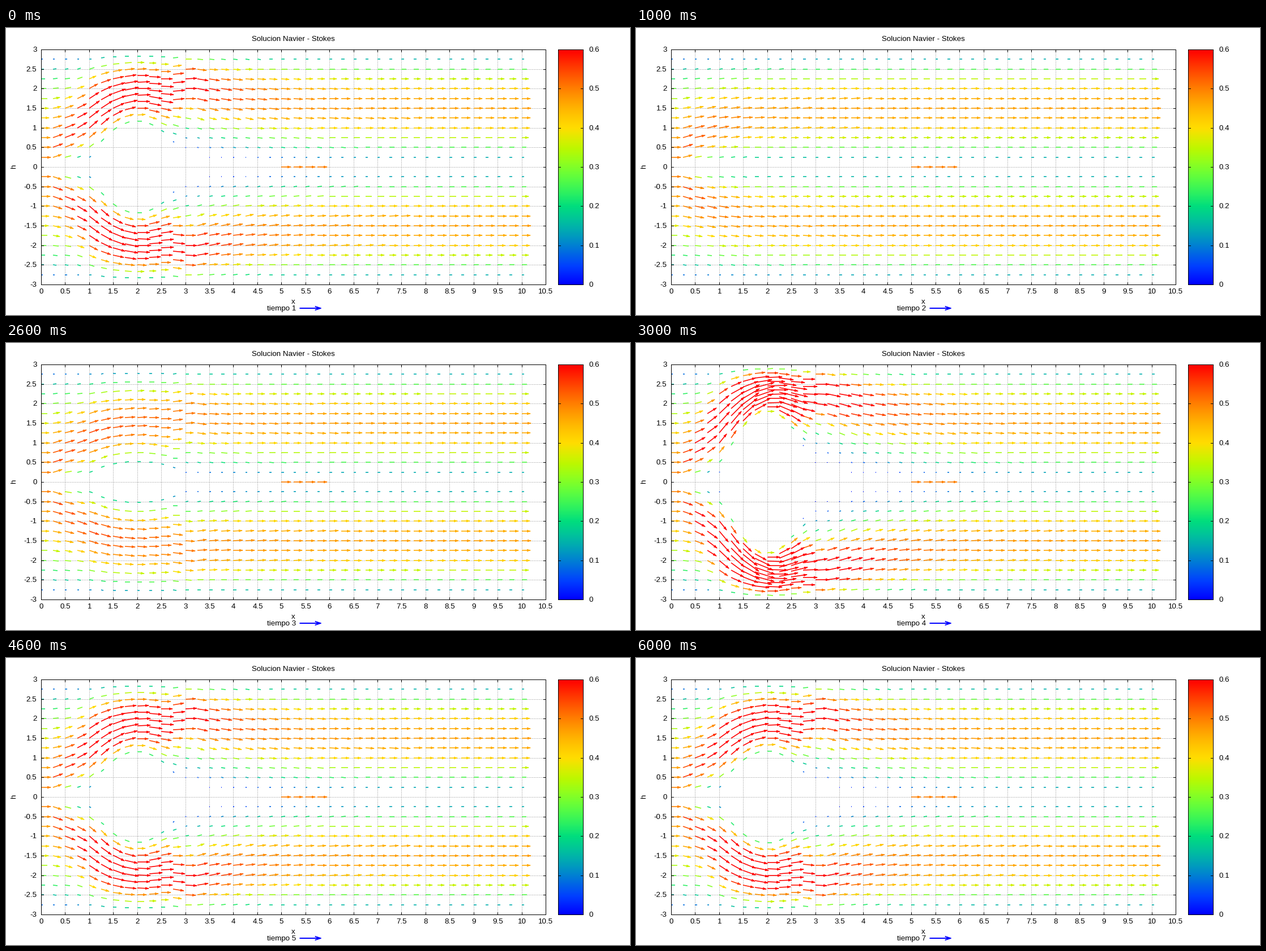
A matplotlib script that plays this animation: 1102 px wide and 508 px high, repeating every 7 s.

```python
import numpy as np
import matplotlib.pyplot as plt
from matplotlib.animation import FuncAnimation
from matplotlib.collections import LineCollection, PolyCollection
from matplotlib.patches import Rectangle

W, H, DPI = 1102, 508, 100
LEFT, RIGHT, TOP, BOTTOM = 62, 953, 38, 454
BAR_LEFT, BAR_RIGHT = 975, 1019
PX = 72 / DPI                      # one pixel in points
HALF = 3.0                         # half height of the channel
SCALE = 0.4                        # arrow length per unit of speed
HEAD_SPEED = 0.353                 # slower arrows carry no head
BUMPS = [1, 0, 0.3, 1.7, 0.98, 1, 1]
FINE = np.linspace(0, 1, 401)

plt.rcParams["font.family"] = "Liberation Sans"
plt.rcParams["font.size"] = 13.4 * PX


def px(x):
    return LEFT + x * (RIGHT - LEFT) / 10.5


def py(h):
    return (TOP + BOTTOM) / 2 - h * (BOTTOM - TOP) / (2 * HALF)


def palette(speed):
    t = np.clip(np.asarray(speed) / 0.6, 0, 1)
    rgb = [3 * t - 1, np.sin(np.pi * t), 1.16 - 2 * t]
    return np.clip(np.stack(rgb, axis=-1), 0, 1)


def bump_height(x, bump):
    return bump * max(0, 1 - (x - 2) ** 2)


def flux(x, h, bump):
    """Share of the flow that passes between the inner wall and height h."""
    front = max(min(x, 2 - x), 0)
    wake = np.clip(x - 2, 0, 1) ** 3 * np.exp(-max(x - 3, 0) / 1.2)
    blocking = 1 + bump * min(x, 1) ** 2
    delta = max((0.17 * x + 0.06 * x ** 3) * blocking, 1e-3)
    inlet = np.exp(-(x / 1.3) ** 2 * blocking)
    power = 1 + bump * (0.5 * front ** 2 + 1.6 * wake)
    shape = -np.expm1(-(FINE / delta) ** power) * (1 - FINE) * (1 + inlet * FINE)
    total = np.concatenate([[0], np.cumsum(shape[1:] + shape[:-1])])
    base = bump_height(x, bump)
    s = np.clip((h - base) / (HALF - base), 0, 1)
    return np.interp(s, FINE, total / total[-1])


def column(x, bump):
    base = bump_height(x, bump)
    h = base + np.arange(1, 12) / 12 * (HALF - base)
    u = (flux(x, h + 0.02, bump) - flux(x, h - 0.02, bump)) / 0.04
    u *= 1 - 0.06 * min(x / 2, 1)
    if x == 0:
        v = np.zeros_like(u)
    else:
        v = (flux(x - 0.1, h, bump) - flux(x + 0.1, h, bump)) / 0.2
    if x == 10:
        u *= 1.01
    return np.stack([np.full_like(h, x), h, u, v], axis=1)


def field(bump):
    upper = np.concatenate([column(k / 4, bump) for k in range(41)])
    lower = upper * [1, -1, 1, -1]
    middle = [[x, 0, 0.5, 0] for x in (5, 5.25, 5.5, 5.75)]
    return np.concatenate([upper, lower, middle])


def arrows(bump):
    x, h, u, v = field(bump).T
    speed = np.hypot(u, v)
    start = np.stack([px(x), py(h)], axis=1)
    end = np.stack([px(x + SCALE * u), py(h + SCALE * v)], axis=1)
    start, end = np.round(start), np.round(end)
    headed = speed > HEAD_SPEED
    tip = end[headed]
    along = tip - start[headed]
    along /= np.linalg.norm(along, axis=1, keepdims=True)
    across = along[:, ::-1] * [-1, 1]
    tip = tip + along
    back = tip - 7 * along
    heads = np.stack([tip, back + 2.4 * across, back - 2.4 * across], axis=1)
    colors = palette(speed)
    return np.stack([start, end], axis=1), colors, heads, colors[headed]


fig = plt.figure(figsize=(W / DPI, H / DPI), dpi=DPI, facecolor="white")
ax = fig.add_axes([0, 0, 1, 1])
ax.axis("off")


def line(xs, ys, color="black", width=1, **style):
    """Line through pixel centres."""
    ax.plot(np.add(xs, 0.5), np.add(ys, 0.5), color=color, lw=width * PX,
            snap=False, **style)


def label(x, y, text, ha="center", **style):
    return ax.text(x, y, text, ha=ha, va="baseline", **style)


def frame(left, right):
    ax.add_patch(Rectangle((left + 0.5, TOP + 0.5), right - left, BOTTOM - TOP,
                           fill=False, ec="black", lw=PX, zorder=4, snap=False))


DOTS = dict(color="#808080", ls=(0, (1, 2)), zorder=1)

for k in range(22):
    x = round(px(k / 2))
    if 0 < k < 21:
        line([x, x], [BOTTOM, TOP], **DOTS)
    line([x, x], [TOP, TOP + 4], zorder=4)
    line([x, x], [BOTTOM - 4, BOTTOM], zorder=4)
    label(x + 0.5, 470, f"{k / 2:g}")

for k in range(-6, 7):
    y = round(py(k / 2))
    if abs(k) < 6:
        line([LEFT, RIGHT], [y, y], **DOTS)
    line([LEFT, LEFT + 4], [y, y], zorder=4)
    line([RIGHT - 4, RIGHT], [y, y], zorder=4)
    label(54.5, y + 4, f"{k / 2:g}", ha="right")

ramp = palette(np.linspace(0.6, 0, 256))[:, None, :]
ax.imshow(ramp, extent=(BAR_LEFT, BAR_RIGHT + 1, BOTTOM + 1, TOP), aspect="auto", zorder=2)
for k in range(7):
    y = round(BOTTOM - k * (BOTTOM - TOP) / 6)
    line([BAR_LEFT, BAR_LEFT + 4], [y, y], zorder=4)
    line([BAR_RIGHT - 4, BAR_RIGHT], [y, y], zorder=4)
    label(1030, y + 4, f"{k / 10:g}", ha="left")

frame(LEFT, RIGHT)
frame(BAR_LEFT, BAR_RIGHT)

label(507, 23, "Solucion Navier - Stokes")
label(507, 488, "x")
label(14, 246, "h", rotation=90)
time_label = label(512, 500, "", ha="right")
line([519, 555], [495.5, 495.5], "blue", 2)
line([546, 555, 546], [492.5, 495.5, 498.5], "blue", 1.8)

shafts = LineCollection([], linewidths=1.6 * PX, capstyle="butt", snap=False, zorder=3)
tips = PolyCollection([], linewidths=0, snap=False, zorder=3)
ax.add_collection(shafts, autolim=False)
ax.add_collection(tips, autolim=False)
ax.set_xlim(0, W)
ax.set_ylim(H, 0)
ax.set_aspect("auto")


def update(i):
    lines, line_colors, heads, head_colors = arrows(BUMPS[i])
    shafts.set_segments(lines)
    shafts.set_color(line_colors)
    tips.set_verts(heads)
    tips.set_facecolor(head_colors)
    time_label.set_text(f"tiempo {i + 1}")
    return shafts, tips, time_label


animation = FuncAnimation(fig, update, frames=len(BUMPS), interval=1000,
                          repeat=True, repeat_delay=0, blit=False)
plt.show()
```
